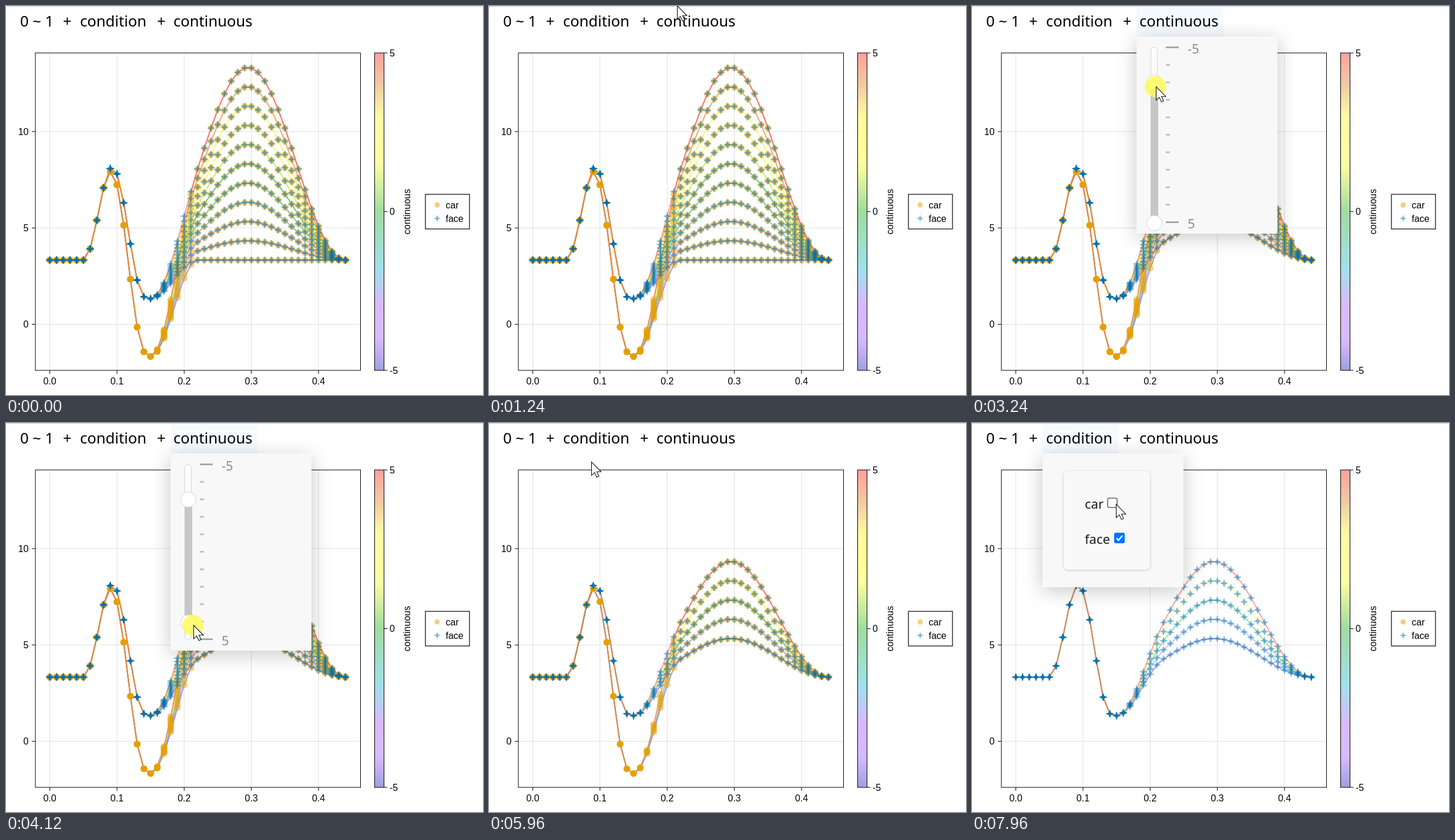
An HTML page with a canvas that plays this animation: 812x663 px, repeating every 8000 ms.

```html
<!DOCTYPE html>
<html lang="en">
<head>
<meta charset="utf-8">
<title>Effects plot</title>
<style>
  html, body { margin: 0; width: 100%; height: 100%; overflow: hidden; background: #fff; }
  #stage { position: relative; width: 812px; height: 663px; overflow: hidden; }
  #stage > svg, #stage > canvas { position: absolute; left: 0; top: 0; }
  .axis { font: 16px "Liberation Sans", Arial, sans-serif; }
  .title { font: 500 25.6px "Noto Sans", "Open Sans", sans-serif; }
  .label { font: 22px "Noto Sans", "Open Sans", sans-serif; }
  .popup { position: absolute; top: 52px; width: 240px; background: #f8f8f8; box-shadow: 0 6px 32px rgba(0, 0, 0, .22); }
  #sliderPopup { left: 280px; height: 336px; }
  #checkPopup { left: 120px; height: 228px; }
  .card { position: absolute; left: 36px; top: 30px; width: 147px; height: 168px; border-radius: 8px; background: #f9f9f9; box-shadow: 0 1px 4px rgba(0, 0, 0, .2); }
  .hover { fill: #f5fafe; }
</style>
</head>
<body>
<div id="stage">
  <svg id="base" width="812" height="663">
    <path d="M0 .5H812" stroke="#c8c8c8"/>
    <rect id="hoverContinuous" class="hover" x="280" y="1" width="148" height="51"/>
    <rect id="hoverCondition" class="hover" x="120" y="1" width="129" height="51"/>
    <g class="title">
      <text x="24" y="35">0 ~ 1</text>
      <text x="97" y="35">+</text>
      <text x="126" y="35">condition</text>
      <text x="257" y="35">+</text>
      <text x="285" y="35">continuous</text>
    </g>
    <defs><linearGradient id="bar" x1="0" y1="1" x2="0" y2="0"></linearGradient></defs>
    <g id="axes" class="axis"></g>
    <rect x="627.5" y="80" width="16" height="541" fill="url(#bar)" fill-opacity=".5" stroke="#000"/>
    <text class="axis" transform="translate(688 350.5) rotate(-90)" text-anchor="middle">continuous</text>
    <rect x="714" y="321" width="75" height="59" fill="#fff" stroke="#000" stroke-width="1.2"/>
    <circle cx="734" cy="339" r="4.5" fill="#e69f00" fill-opacity=".5"/>
    <path transform="translate(734 362)" d="M0-6L1.6-1.6L6 0L1.6 1.6L0 6L-1.6 1.6L-6 0L-1.6-1.6Z" fill="#0072b2" fill-opacity=".5"/>
    <text class="axis" x="748.5" y="345">car</text>
    <text class="axis" x="748.5" y="368">face</text>
  </svg>
  <canvas id="plot" width="812" height="663"></canvas>
  <div id="sliderPopup" class="popup"></div>
  <div id="checkPopup" class="popup"><div class="card"></div></div>
  <svg width="812" height="663">
    <g id="slider" class="label" fill="#8c8c8c">
      <rect x="304.5" y="70.5" width="11" height="299" rx="5.5" fill="#fbfcfb" stroke="#d3d8d5"/>
      <rect id="span" x="304" width="13" fill="#c6c6c6"/>
      <g id="ticks"></g>
      <text x="367" y="81">-5</text>
      <text x="367" y="379">5</text>
      <circle id="knobLow" cx="310.5" r="13" fill="#fff" stroke="#d4d4d4"/>
      <circle id="knobHigh" cx="310.5" r="13" fill="#fff" stroke="#d4d4d4"/>
    </g>
    <g id="checks" class="label" fill="#1b1b1b">
      <text x="192" y="146">car</text>
      <text x="192" y="206">face</text>
      <rect x="231" y="128" width="16" height="16" rx="2.5" fill="#fff" stroke="#666" stroke-width="1.6"/>
      <g id="carTick" transform="translate(230 127)"></g>
      <g id="faceTick" transform="translate(242 187)"></g>
    </g>
    <g id="cursor">
      <circle id="press" cx="-.5" cy=".5" r="18" fill="#fffa5c" fill-opacity=".85"/>
      <path d="M.5.5V23.5L5.7 18.6L9.4 26.4L13 24.8L9.6 17.2H16.8Z" fill="#fff" stroke="#111" stroke-width="1.1"/>
    </g>
  </svg>
</div>
<script>
const $ = id => document.getElementById(id);
const LOOP = 8000;
const px = x => 74.6 + 1143.5 * x;
const py = y => 542.5 - 32.85 * y;

const rainbow = [
  [0, 65, 65, 190], [.1, 175, 120, 255], [.2, 181, 115, 255], [.32, 65, 195, 215], [.5, 65, 185, 65],
  [.65, 250, 255, 65], [.8, 255, 245, 70], [.9, 228, 150, 70], [1, 255, 65, 58]
];

function rainbowAt(t) {
  const i = Math.max(1, rainbow.findIndex(s => s[0] >= t));
  const a = rainbow[i - 1], b = rainbow[i], f = (t - a[0]) / (b[0] - a[0]);
  return `rgb(${[1, 2, 3].map(k => Math.round(a[k] + (b[k] - a[k]) * f))})`;
}

function buildStatic() {
  $('bar').innerHTML = rainbow.map(([t]) => `<stop offset="${t}" stop-color="${rainbowAt(t)}"/>`).join('');
  let grid = '', marks = '', text = '';
  for (let i = 0; i < 5; i++) {
    const x = px(i / 10);
    grid += `M${x} 80V621`;
    marks += `M${x} 621v6`;
    text += `<text x="${x}" y="645" text-anchor="middle">${(i / 10).toFixed(1)}</text>`;
  }
  for (const v of [0, 5, 10]) {
    const y = py(v);
    grid += `M50 ${y}H603`;
    marks += `M50 ${y}h-6`;
    text += `<text x="38.5" y="${y + 5.7}" text-anchor="end">${v}</text>`;
  }
  for (const v of [-5, 0, 5]) {
    const y = 350.5 - 54.1 * v;
    marks += `M643.5 ${y}h6`;
    text += `<text x="653" y="${y + 5.7}">${v}</text>`;
  }
  $('axes').innerHTML = `<path d="${grid}" stroke="#000" stroke-opacity=".13"/>
    <rect x="50" y="80" width="553.5" height="541" fill="none" stroke="#000"/>
    <path d="${marks}" stroke="#000"/>${text}`;
  for (let i = 0; i <= 10; i++) {
    const major = i % 10 === 0;
    $('ticks').innerHTML += `<rect x="330" y="${69 + 29.8 * i}" width="${major ? 22 : 7}" height="3" fill="${major ? '#a9a9a9' : '#c2c2c2'}"/>`;
  }
  $('carTick').innerHTML = $('faceTick').innerHTML =
    '<rect width="18" height="18" rx="3" fill="#0075ff"/><path d="M4 9.4L7.4 12.8L14 5" fill="none" stroke="#fff" stroke-width="2.4"/>';
}

// Raised-cosine bump over n samples starting at sample `start`
function bump(i, start, n) {
  const k = i - start;
  return k < 0 || k >= n ? 0 : Math.sin(Math.PI * k / (n - 1)) ** 2;
}

function response(i, face, c) {
  return 3.33 + 5 * bump(i, 5, 10) - (face ? 2 : 5) * bump(i, 8, 15) + (5 + c) * bump(i, 15, 30);
}

const ctx = $('plot').getContext('2d');

function addMarker(x, y, face) {
  ctx.beginPath();
  if (face) {
    for (let k = 0; k < 8; k++) {
      const r = k % 2 ? 2.7 : 7, a = k * Math.PI / 4;
      ctx.lineTo(x + r * Math.cos(a), y + r * Math.sin(a));
    }
  } else {
    ctx.arc(x, y, 5.6, 0, 7);
  }
  ctx.fill();
}

let drawn = '';
function drawPlot(low, high, car) {
  const key = [low, high, car].join();
  if (key === drawn) return;
  drawn = key;
  ctx.clearRect(0, 0, 812, 663);
  ctx.globalAlpha = .5;
  ctx.lineWidth = 2;
  ctx.lineJoin = 'round';
  const groups = car ? [false, true] : [true];
  const each = (face, draw) => {
    for (let c = low; c <= high; c++) draw(c, i => [px(i / 100), py(response(i, face, c))]);
  };
  for (const face of groups) each(face, (c, at) => {
    ctx.strokeStyle = rainbowAt((c - low) / (high - low));
    ctx.beginPath();
    for (let i = 0; i < 45; i++) ctx.lineTo(...at(i));
    ctx.stroke();
  });
  for (const face of groups) {
    ctx.fillStyle = face ? '#0072b2' : '#e69f00';
    each(face, (c, at) => {
      for (let i = 0; i < 45; i++) addMarker(...at(i), face);
    });
  }
}

// Pointer path: time, x, y
const path = [
  [80, 748, 619], [320, 430, 300], [520, 250, 160], [760, 90, 400], [880, 78, 529], [1060, 190, 250],
  [1240, 320, -1], [1440, 338, 22], [1760, 318, 52], [1960, 313, 68], [2160, 313, 68], [2600, 313, 105],
  [3040, 313, 137], [3320, 313, 137], [3440, 313, 172], [3760, 319, 372], [3920, 319, 372],
  [4640, 319, 254], [4880, 319, 254], [5200, 485, 602], [5320, 470, 590], [5960, 174, 66],
  [6040, 168, 42], [6280, 160, 20], [6880, 245, 138], [8000, 245, 138]
];

function pointerAt(t) {
  const i = Math.max(1, path.findIndex(p => p[0] >= t));
  const a = path[i - 1], b = path[i];
  const f = Math.min(1, Math.max(0, (t - a[0]) / (b[0] - a[0])));
  const e = (f + f * f * (3 - 2 * f)) / 2;
  return [a[1] + (b[1] - a[1]) * e, a[2] + (b[2] - a[2]) * e];
}

const within = (t, a, b) => t >= a && t < b;
const clamp = (t, a, b) => Math.min(b, Math.max(a, t));

function rangeAt(t) {
  const lowY = pointerAt(clamp(t, 1960, 3320))[1];
  const highY = pointerAt(clamp(t, 3920, 4880))[1];
  return [Math.round((lowY - 68) / 30) - 5, Math.round((highY - 372) / 30) + 5];
}

const show = (id, on) => { $(id).style.display = on ? '' : 'none'; };

function render(t) {
  const [low, high] = rangeAt(t);
  const car = t < 7060;
  drawPlot(...rangeAt(t - 80), car);

  const sliderOpen = within(t, 1480, 5080), checksOpen = t >= 6020;
  for (const id of ['hoverContinuous', 'sliderPopup', 'slider']) show(id, sliderOpen);
  for (const id of ['hoverCondition', 'checkPopup', 'checks']) show(id, checksOpen);
  show('carTick', car);

  const lowY = 220.5 + 30 * low, highY = 220 + 30 * high;
  $('knobLow').setAttribute('cy', lowY);
  $('knobHigh').setAttribute('cy', highY);
  $('span').setAttribute('y', lowY);
  $('span').setAttribute('height', highY - lowY);

  const [x, y] = pointerAt(t);
  show('cursor', t >= 80);
  show('press', within(t, 1960, 3320) || within(t, 3840, 4880) || within(t, 7030, 7080));
  $('cursor').setAttribute('transform', `translate(${x} ${y})`);
}

buildStatic();
const start = performance.now();
function tick() {
  render((performance.now() - start) % LOOP);
  requestAnimationFrame(tick);
}
render(0);
requestAnimationFrame(tick);
</script>
</body>
</html>
```
